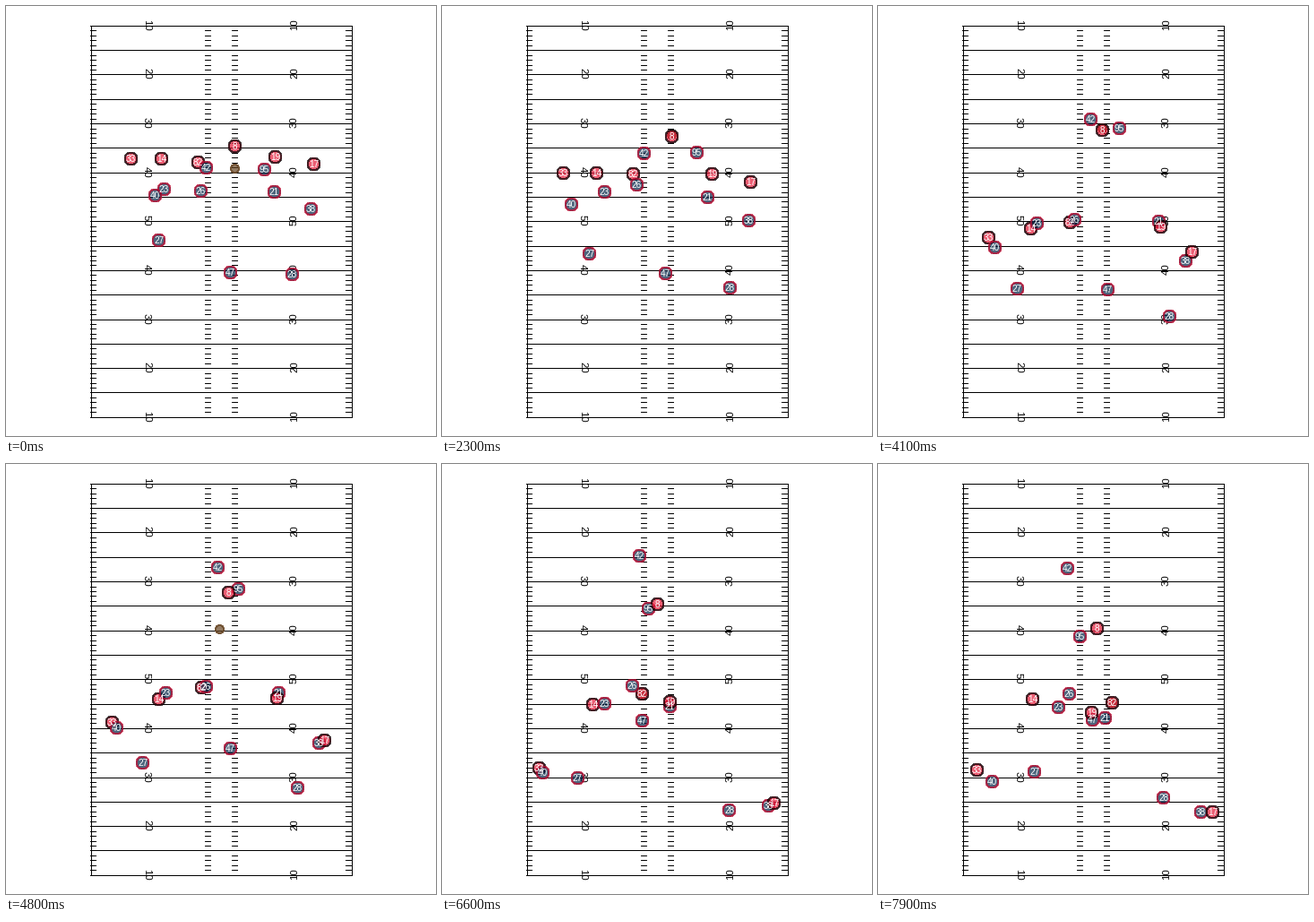
These frames come from a looping animation (480 by 480 pixels, 8 s). A matplotlib script:

```python
import matplotlib.pyplot as plt
import numpy as np
from matplotlib.animation import FuncAnimation
from matplotlib.colors import to_rgba
from matplotlib.patches import Circle

SIZE, DPI = 480, 100
PX = 72 / DPI
FRAMES, STEP = 80, 100
KEYS = [0, 1.5, 3, 4.1, 5.6, 6.6, 7.9]

LEFT, RIGHT, TOP, YARD = 94, 385, 21.3, 5.4625
ALPHA = 0.7
RED = ("#e31837", "black")
NAVY = ("#002244", "#c60c30")
BROWN = ("#654321", "#654321")

fig = plt.figure(figsize=(SIZE / DPI, SIZE / DPI), dpi=DPI, facecolor="white")
ax = fig.add_axes([0, 0, 1, 1])
ax.set_xlim(0, SIZE)
ax.set_ylim(SIZE, 0)
ax.axis("off")


def row(yard):
    return int(TOP + yard * YARD) + 0.5


def rule(x0, y0, x1, y1):
    ax.plot([x0, x1], [y0, y1], color="black", lw=PX, antialiased=False,
            solid_capstyle="butt", zorder=1)


def label(x, y, text, size, color, angle=0, z=1):
    return ax.text(x, y, text, fontsize=size * PX, color=color,
                   family="Liberation Sans", ha="center", va="baseline",
                   rotation=angle, rotation_mode="anchor", zorder=z)


def disc(radius, style, z):
    fill, edge = (to_rgba(c, ALPHA) for c in style)
    return ax.add_patch(Circle((0, 0), radius, facecolor=fill, edgecolor=edge,
                               lw=PX, antialiased=False, zorder=z))


def draw_field():
    for yard in range(81):
        y = row(yard)
        if yard % 5 == 0:
            rule(LEFT, y, RIGHT + 1, y)
        else:
            for x in (LEFT, 222, 252, RIGHT - 6):
                rule(x, y, x + 6, y)
        if yard % 10 == 0:
            text = str(50 - abs(40 - yard))
            label(154, y - 0.5, text, 11.4, "black", 270)
            label(325, y - 0.5, text, 11.4, "black", 90)
    for x in (LEFT, RIGHT):
        rule(x + 0.5, row(0), x + 0.5, row(80))


class Path:
    """Smooth curve through timed points, steady up to the second one."""

    def __init__(self, points, times):
        self.t = np.array(times, float)
        self.p = np.array(points, float)
        h = np.diff(self.t)[:, None]
        d = np.diff(self.p, axis=0) / h
        m = np.empty_like(self.p)
        m[1:-1] = (d[:-1] * h[1:] + d[1:] * h[:-1]) / (h[1:] + h[:-1])
        m[:2] = d[0]
        m[-1] = 2 * d[-1] - m[-2]
        self.m = m

    def at(self, t):
        i = min(np.searchsorted(self.t, t, side="right") - 1, len(self.t) - 2)
        h = self.t[i + 1] - self.t[i]
        s = (t - self.t[i]) / h
        return ((1 + 2 * s) * (1 - s) ** 2 * self.p[i]
                + s * (1 - s) ** 2 * h * self.m[i]
                + s * s * (3 - 2 * s) * self.p[i + 1]
                + s * s * (s - 1) * h * self.m[i + 1])


class Player:
    def __init__(self, number, style, *points, times=KEYS):
        self.path = Path(points, times)
        self.disc = disc(7, style, 3)
        self.text = label(0, 0, str(number), 10, "white", z=4)

    def move(self, t):
        x, y = np.round(self.path.at(t))
        self.disc.center = x + 0.5, y + 0.5
        self.text.set_position((x + 0.5, y + 4))


draw_field()
ball = disc(4.6, BROWN, 2)

receiver = Player(82, RED, (214, 174), (214, 175), (212, 207), (214, 241),
                  (222, 251), (223, 256), (261, 266))
players = [
    receiver,
    Player(14, RED, (173, 170), (173, 171), (171, 210), (170, 248),
           (170, 270), (168, 268), (172, 262)),
    Player(33, RED, (139, 170), (138, 171), (131, 211), (123, 258),
           (112, 317), (108, 339), (110, 341)),
    Player(42, NAVY, (223, 180), (224, 179), (228, 145), (237, 126),
           (231, 105), (220, 102), (211, 116)),
    Player(95, NAVY, (288, 182), (288, 178), (278, 146), (269, 136),
           (245, 147), (230, 161), (225, 192)),
    Player(23, NAVY, (176, 204), (181, 203), (179, 216), (177, 242),
           (179, 264), (181, 267), (201, 271)),
    Player(40, NAVY, (166, 211), (149, 214), (140, 234), (130, 269),
           (116, 321), (112, 344), (127, 354)),
    Player(26, NAVY, (217, 206), (216, 199), (218, 207), (219, 238),
           (224, 252), (212, 247), (213, 256)),
    Player(21, NAVY, (299, 207), (298, 208), (298, 221), (313, 240),
           (283, 269), (254, 270), (253, 283)),
    Player(38, NAVY, (340, 226), (341, 230), (342, 254), (343, 284),
           (357, 345), (364, 381), (360, 388)),
    Player(27, NAVY, (170, 261), (165, 267), (162, 289), (155, 315),
           (150, 349), (151, 350), (174, 343)),
    Player(47, NAVY, (250, 297), (249, 296), (251, 303), (256, 316),
           (239, 310), (223, 286), (239, 285)),
    Player(28, NAVY, (319, 299), (320, 306), (322, 325), (325, 346),
           (323, 376), (320, 386), (318, 372)),
    Player(19, RED, (300, 168), (301, 170), (304, 211), (315, 246),
           (279, 269), (254, 265), (238, 277)),
    Player(17, RED, (343, 176), (343, 178), (346, 224), (350, 274),
           (361, 345), (370, 378), (372, 391), (373, 388),
           times=KEYS[:-1] + [7.2, 7.9]),
]
passer = Player(8, RED, (255, 156), (256, 155), (255, 135), (250, 138),
                (245, 149), (240, 156), (244, 183))
players.append(passer)

SPOT = np.array([255, 181])
HELD = np.array([0, -2])
SNAP, CAUGHT, THROW, CATCH = 1.0, 1.6, 4.4, 5.4


def ball_at(t):
    if t < SNAP:
        return SPOT
    if t < CAUGHT:
        s = (t - SNAP) / (CAUGHT - SNAP)
        return SPOT + s * (passer.path.at(CAUGHT) - SPOT)
    if t < THROW:
        return passer.path.at(t) + HELD
    if t < CATCH:
        start, end = passer.path.at(THROW), receiver.path.at(CATCH)
        return start + (t - THROW) / (CATCH - THROW) * (end - start)
    return receiver.path.at(t)


def update(frame):
    t = frame * STEP / 1000
    for player in players:
        player.move(t)
    ball.center = tuple(np.round(ball_at(t)) + 0.5)
    return []


anim = FuncAnimation(fig, update, frames=FRAMES, interval=STEP,
                     repeat=True, repeat_delay=0)
plt.show()
```
